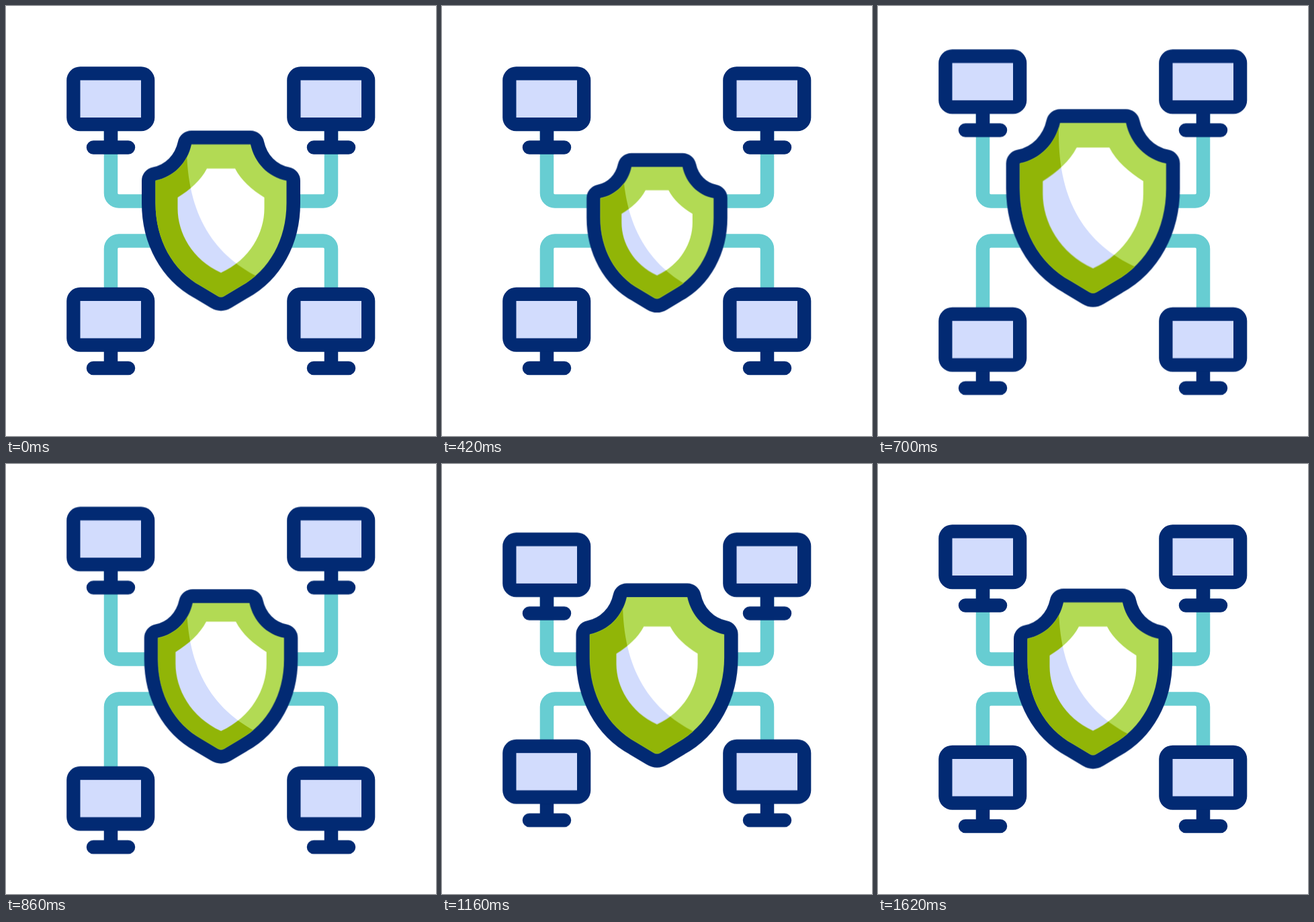
Write an HTML page that moves like this. It is 640 px wide and 640 px high and loops after 2.2 s.

```html
<!DOCTYPE html>
<html lang="en">
<head>
<meta charset="utf-8">
<title>Network shield</title>
<style>
  :root {
    --navy: #022a73;
    --teal: #67cdd2;
    --amber: #ffcb50;
    --lilac: #d2dcfd;
    --lime: #b2da54;
    --moss: #91b507;
  }
  html, body { margin: 0; width: 100%; height: 100%; overflow: hidden; background: #fff; }
  svg { display: block; width: 100%; height: 100%; }

  .screen { fill: var(--lilac); stroke: var(--navy); stroke-width: 40.6; stroke-linejoin: round; paint-order: stroke; }
  .stand { fill: none; stroke: var(--navy); stroke-width: 20.5; stroke-linecap: round; }
  .wire, .pulse { fill: none; stroke-width: 20.5; }
  .wire { stroke: var(--teal); }
  .pulse { stroke: var(--amber); stroke-linecap: round; stroke-dasharray: 1 2; }
  .rim { fill: var(--lime); stroke: var(--navy); stroke-width: 41; stroke-linejoin: round; paint-order: stroke; }

  .up, .down, .float, .grow, .core, .pulse {
    animation: 2200ms cubic-bezier(.37, 0, .63, 1) infinite;
  }
  .up { animation-name: up; }
  .down { animation-name: down; }
  .float { animation-name: float; }
  .grow { animation-name: grow; }
  .core { animation-name: core; }
  .pulse { animation-name: pulse; }

  @keyframes up {
    0%, 20.45% { transform: translateY(0); }
    35.91% { transform: translateY(-30.5px); }
    52.27% { transform: translateY(12px); }
    60.91% { transform: translateY(-13.4px); }
    73.64%, 100% { transform: translateY(0); }
  }
  @keyframes down {
    0%, 20.45% { transform: translateY(0); }
    35.91% { transform: translateY(35.2px); }
    52.27% { transform: translateY(-9px); }
    60.91% { transform: translateY(10px); }
    73.64%, 100% { transform: translateY(0); }
  }
  @keyframes float {
    0%, 9.55% { transform: translateY(0); }
    20% { transform: translateY(18.3px); }
    32.73% { transform: translateY(-19.3px); }
    44.09% { transform: translateY(7px); }
    56.82% { transform: translateY(-8.4px); }
    73.64%, 100% { transform: translateY(0); }
  }
  @keyframes grow {
    0%, 9.55% { transform: scale(1); }
    20% { transform: scale(.862); }
    32.73% { transform: scale(1.119); }
    44.09% { transform: scale(.857); }
    56.82% { transform: scale(1.076); }
    73.64%, 100% { transform: scale(1); }
  }
  @keyframes core {
    0%, 9.55% { transform: scale(1); }
    20% { transform: scale(.815); }
    33.64% { transform: scale(1.174); }
    47.27% { transform: scale(.817); }
    59.55% { transform: scale(1.107); }
    73.64%, 100% { transform: scale(1); }
  }
  @keyframes pulse {
    0%, 20% { stroke-dashoffset: 1.1; }
    35.36%, 40.91% { stroke-dashoffset: 0; }
    52.27%, 100% { stroke-dashoffset: -1.1; }
  }
</style>
</head>
<body>
<svg viewBox="0 0 640 640">
  <defs>
    <g id="monitor">
      <path class="stand" d="M156 180V210.5M130 210.5H182"/>
      <rect class="screen" x="110.5" y="110.5" width="90.5" height="55.5"/>
    </g>
    <g id="link">
      <path class="wire" d="M320 290.5H168a12 12 0 0 1-12-12V140"/>
      <path class="pulse" pathLength="1" d="M230 290.5H168a12 12 0 0 1-12-12V195"/>
    </g>
    <path id="shield" vector-effect="non-scaling-stroke" d="M-44-113.5H44C50-86 70-65 97.5-59.5V-26C97.5 28 72 74 30 97L5 112Q0 115-5 112L-30 97C-72 74-97.5 28-97.5-26V-59.5C-70-65-50-86-44-113.5Z"/>
    <path id="crest" d="M-21-77.5H21C30-60 46-46 64.5-34.5V-18C64.5 18 43 58 0 77.5C-43 58-64.5 18-64.5-18V-34.5C-46-46-30-60-21-77.5Z"/>
    <clipPath id="shade">
      <path d="M-51-200V-110C-51-10-11 54 64 88L140 115V200H-200V-200Z"/>
    </clipPath>
  </defs>

  <use href="#link"/>
  <use href="#link" transform="matrix(-1 0 0 1 640 0)"/>
  <use href="#link" transform="matrix(1 0 0 -1 0 640)"/>
  <use href="#link" transform="matrix(-1 0 0 -1 640 640)"/>

  <g class="up">
    <use href="#monitor"/>
    <use href="#monitor" x="328"/>
  </g>
  <g class="down">
    <use href="#monitor" y="328.5"/>
    <use href="#monitor" x="328" y="328.5"/>
  </g>

  <g transform="translate(320 319.5)">
    <g class="float">
      <g class="grow rim"><use href="#shield"/></g>
      <g class="core" fill="#fff"><use href="#crest"/></g>
      <g clip-path="url(#shade)">
        <g class="grow" fill="var(--moss)"><use href="#shield"/></g>
        <g class="core" fill="var(--lilac)"><use href="#crest"/></g>
      </g>
    </g>
  </g>
</svg>
</body>
</html>
```
